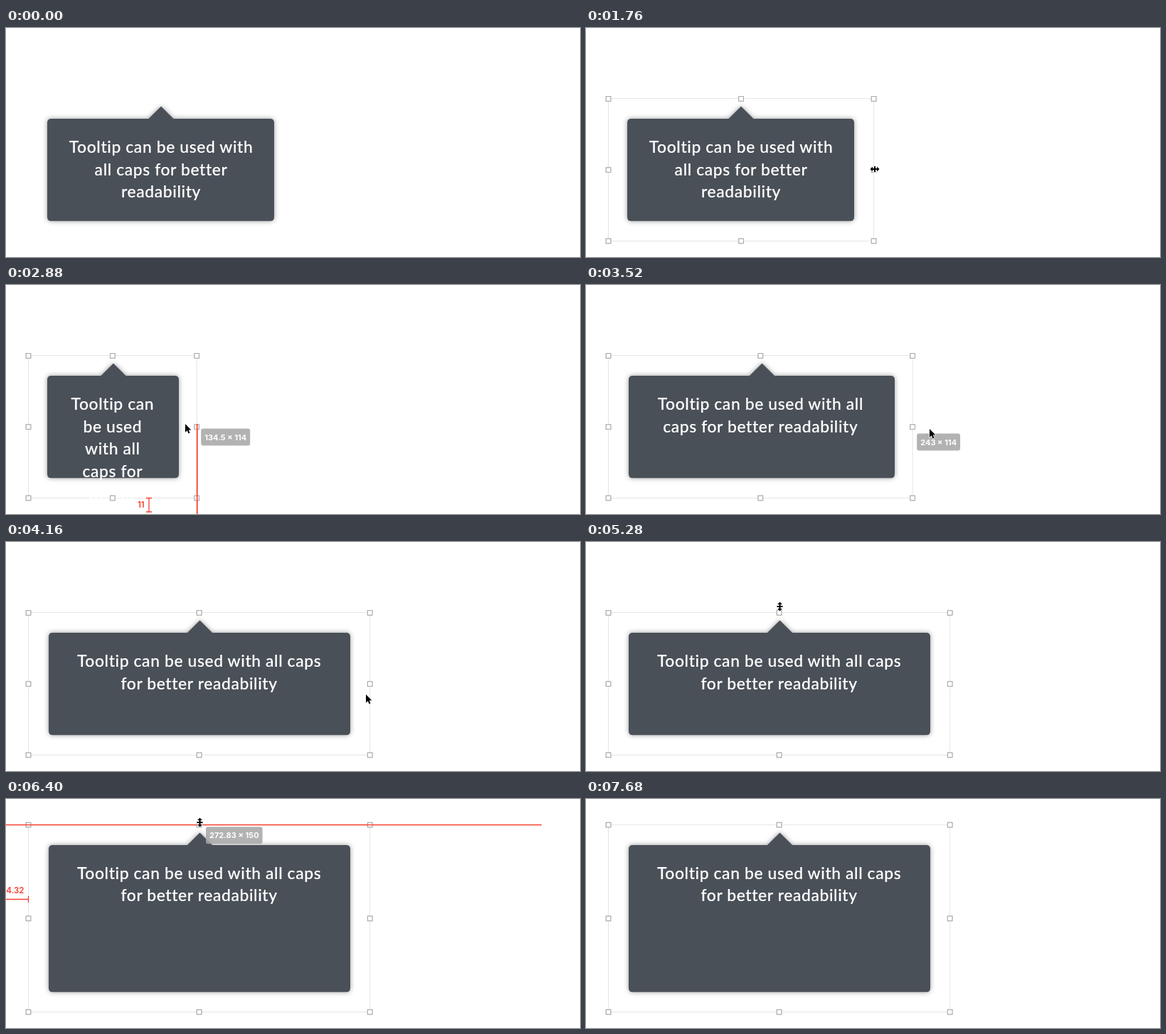
Write an HTML page that moves like this. It is 807 px wide and 323 px high and loops after 8 s.

```html
<!DOCTYPE html>
<html lang="en">
<head>
<meta charset="utf-8">
<title>Resizing a tooltip</title>
<style>
  html, body { margin: 0; width: 100%; height: 100%; overflow: hidden; background: #fff; }
  svg, #copy { position: absolute; left: 0; top: 0; }
  #copy {
    color: #fff; text-align: center;
    font: 500 22.9px/31.68px Lato, "Open Sans", sans-serif;
    letter-spacing: .6px; -webkit-text-stroke: .2px #fff;
  }
  #bubble { fill: #4a5058; filter: drop-shadow(0 .5px 3.5px rgba(0, 0, 0, .4)); }
  #frame { fill: none; stroke: #e6e6e6; }
  #handles rect { fill: #fff; stroke: #a6a6a6; filter: drop-shadow(0 .5px .5px rgba(0, 0, 0, .25)); }
  .guide path { fill: none; stroke: #f5402f; stroke-width: 1.3; }
  .guide .edge { stroke-width: 1.8; }
  .guide text { fill: #f5402f; font: 600 11.5px Inter, Roboto, sans-serif; }
  #size rect { fill: #a6a6a6; fill-opacity: .86; }
  #size text { fill: #fff; font: 700 11px Inter, Roboto, sans-serif; }
  #pointer { stroke: #fff; stroke-width: 1.2; paint-order: stroke; }
</style>
</head>
<body>
<svg width="807" height="323">
  <path id="bubble"/>
  <path id="frame"/>
</svg>
<div id="copy">Tooltip can be used with all caps for better readability</div>
<svg width="807" height="323">
  <g id="handles"></g>
  <g id="below" class="guide">
    <path class="edge" d="M268.7 196V323"/>
    <path d="M201 300.5V320M197 300.5h8M197 320h8"/>
    <text x="185" y="314">11</text>
  </g>
  <g id="above" class="guide">
    <path d="M0 36.5H753M0 141.5H31.5M31.5 137v9"/>
    <text x="25.5" y="133" text-anchor="end">4.32</text>
  </g>
  <g id="size"><rect height="24" rx="3"/><text x="5" y="16"></text></g>
  <path id="pointer"/>
</svg>
<script>
const $ = id => document.getElementById(id);
const LOOP = 8000, STEP = 160, SCALE = 1.76;
const LEFT = 31.5, BOTTOM = 300.5;

// Turning points: [step, value, ...], eased in between
const widths = [[13, 212], [16, 311.5], [18, 134.5], [20, 134.5], [23, 280.975], [26, 272.83]];
const heights = [[33, 114], [36, 159], [38, 150]];
const moves = [[4, 446, 176], [7, 372, 205], [11, 406, 199], [13, 406, 199],
  [16, 590, 205], [18, 252, 196], [20, 252, 196], [22, 483, 203], [26, 506, 215],
  [33, 272.5, 91], [40, 272.5, 33], [44, 290, 121], [46, 290, 121], [47, 346, 124]];

const shapes = {
  arrow: "M0 0V11.8L2.8 9.3 4.6 13.4 6.5 12.5 4.7 8.5H8.4Z",
  across: "M-6.5 0L-3-3.4V-1H-1V-4H1V-1H3V-3.4L6.5 0 3 3.4V1H1V4H-1V1H-3V3.4Z",
  upright: "M0-6.5L3.4-3H1V-1H4V1H1V3H3.4L0 6.5-3.4 3H-1V1H-4V-1H-1V-3H-3.4Z"
};

const within = (n, a, b) => n >= a && n <= b;
const show = (el, on) => el.style.display = on ? "" : "none";
const smooth = p => p * p * (3 - 2 * p);

function at(keys, n) {
  const next = keys.findIndex(k => k[0] >= n);
  const b = keys[next < 0 ? keys.length - 1 : next];
  const a = next > 0 ? keys[next - 1] : b;
  const p = a === b ? 0 : smooth((n - a[0]) / (b[0] - a[0]));
  return a.slice(1).map((v, i) => v + (b[i + 1] - v) * p);
}

const grips = [];
for (let row = 0; row < 3; row++) for (let col = 0; col < 3; col++) {
  if (row === 1 && col === 1) continue;
  const el = document.createElementNS("http://www.w3.org/2000/svg", "rect");
  el.setAttribute("width", 6.6);
  el.setAttribute("height", 6.6);
  $("handles").append(el);
  grips.push({ el, row, col });
}

function bubblePath(l, t, r, b) {
  const c = (l + r) / 2 + .5, q = 5.5, a = 17.6;
  return `M${l + q} ${t}H${c - a}L${c} ${t - a}L${c + a} ${t}H${r - q}` +
    `Q${r} ${t} ${r} ${t + q}V${b - q}Q${r} ${b} ${r - q} ${b}` +
    `H${l + q}Q${l} ${b} ${l} ${b - q}V${t + q}Q${l} ${t} ${l + q} ${t}Z`;
}

function draw(n) {
  const [w] = at(widths, n), [h] = at(heights, n), [x, y] = at(moves, n);
  const right = LEFT + w * SCALE, top = BOTTOM - h * SCALE;
  const hover = within(n, 5, 7), selected = n >= 8;
  const widening = within(n, 14, 25), raising = within(n, 34, 40);
  const inset = widening ? 25.5 : 27.3;

  $("bubble").setAttribute("d", bubblePath(
    n < 21 ? 58 : 60, Math.round(top + 28.2), Math.round(right - inset), 272.2));
  $("copy").style.cssText =
    `left:${LEFT + 55}px;top:${top + 52}px;width:${right - LEFT - 110}px`;

  show($("frame"), hover || selected);
  $("frame").setAttribute("d", `M${LEFT} ${top - .3}H${right}V${BOTTOM}H${LEFT}Z`);
  $("frame").style.stroke = hover ? "#5aaeff" : "";
  $("frame").style.strokeWidth = hover ? 2 : 1;

  show($("handles"), selected);
  for (const { el, row, col } of grips) {
    el.setAttribute("x", LEFT + (right - LEFT) * col / 2 - 3.3);
    el.setAttribute("y", top + (BOTTOM - top) * row / 2 - 3.3);
  }

  show($("below"), within(n, 18, 20));
  show($("above"), within(n, 38, 40));

  show($("size"), widening || raising);
  if (widening || raising) {
    const [plate, text] = $("size").children;
    text.textContent = `${+w.toFixed(2)} × ${+h.toFixed(2)}`;
    plate.setAttribute("width", text.getComputedTextLength() + 10);
    $("size").setAttribute("transform", raising
      ? `translate(281 ${top + 2.8})` : `translate(${right + 6} ${y + 6.5})`);
  }

  const kind = within(n, 11, 13) ? "across" : within(n, 33, 40) ? "upright" : "arrow";
  show($("pointer"), within(n, 2, 47));
  $("pointer").setAttribute("d", shapes[kind]);
  $("pointer").setAttribute("transform", `translate(${x} ${raising ? top - 3.5 : y})`);
}

function tick() {
  draw(Math.floor(performance.now() % LOOP / STEP));
  requestAnimationFrame(tick);
}
tick();
</script>
</body>
</html>
```
